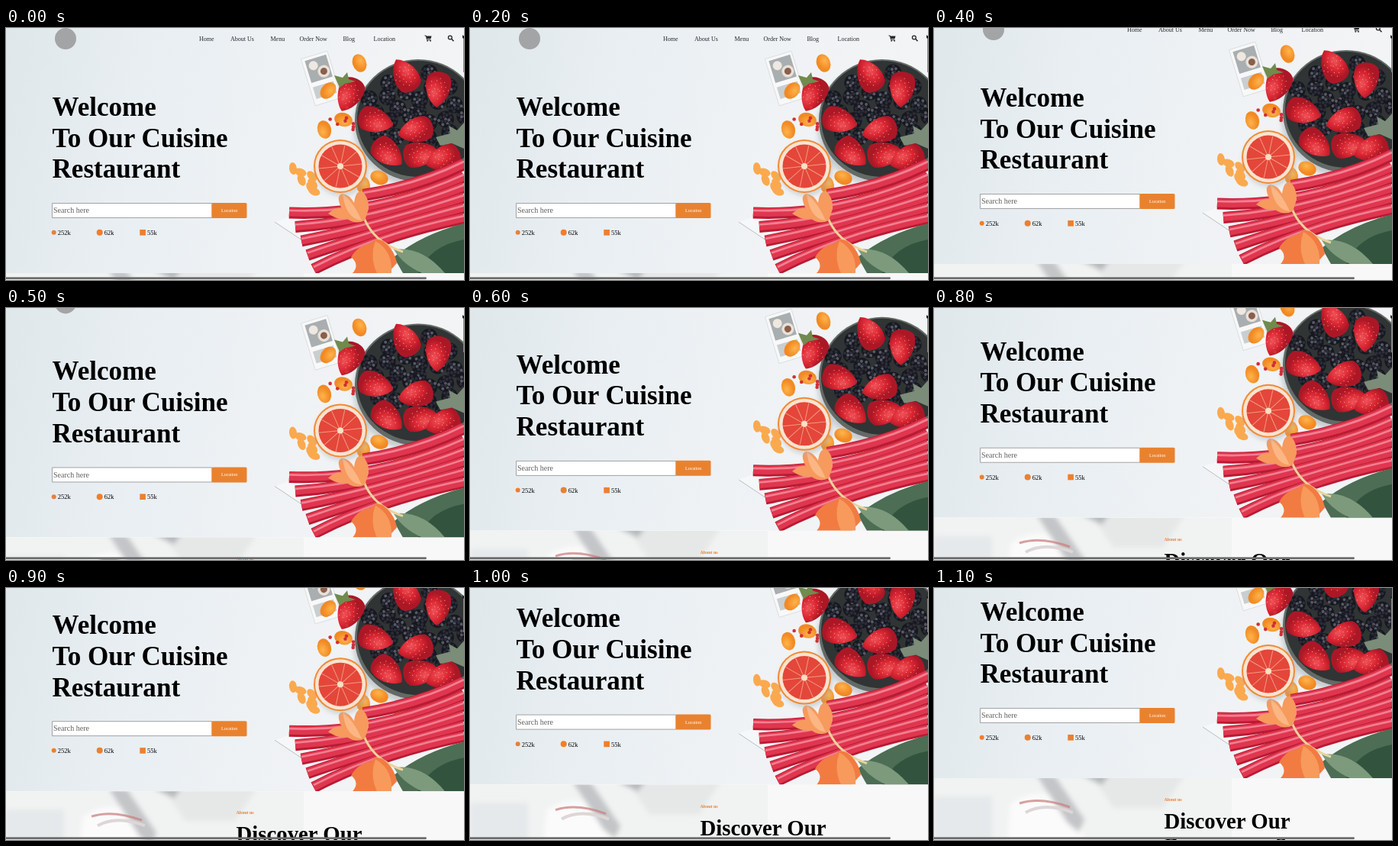
An HTML page for the animation above (1200 ms loop, 600 px wide and 330 px high).

```html
<!DOCTYPE html>
<html lang="en">
<head>
<meta charset="utf-8">
<title>Restaurant page</title>
<style>
html, body { margin: 0; width: 100%; height: 100%; overflow: hidden; background: #f7f8f8; }
svg { display: block; width: 600px; height: 330px; font-family: "Liberation Serif", Times, serif; }
.big { font-size: 35.1px; font-weight: 700; }
.about { font-size: 28.8px; font-weight: 700; }
.nav { font-size: 8px; fill: #25282c; }
.small { font-size: 8.5px; }
.orange { fill: #ee7f2d; }
</style>
</head>
<body>
<svg viewBox="0 0 600 330">
  <defs>
    <linearGradient id="wall" x2="1" y2=".12">
      <stop offset="0" stop-color="#dfe7eb"/>
      <stop offset=".3" stop-color="#e8eef2"/>
      <stop offset=".65" stop-color="#eff2f5"/>
      <stop offset="1" stop-color="#f3f4f5"/>
    </linearGradient>
    <radialGradient id="berry" cx=".4" cy=".35">
      <stop offset="0" stop-color="#f0525a"/>
      <stop offset=".6" stop-color="#d82532"/>
      <stop offset="1" stop-color="#ac1726"/>
    </radialGradient>
    <radialGradient id="citrus" cx=".4" cy=".35">
      <stop offset="0" stop-color="#ffb44c"/>
      <stop offset="1" stop-color="#f18a24"/>
    </radialGradient>
    <filter id="soft"><feGaussianBlur stdDeviation="3"/></filter>
    <clipPath id="hero"><path d="M0 0H600V321H0z"/></clipPath>
    <clipPath id="photo"><path d="M0 321H390V420H0z"/></clipPath>
  </defs>

  <g id="page">
    <g clip-path="url(#hero)">
      <path d="M0 0H600V321H0z" fill="url(#wall)"/>

      <!-- picture card and paper -->
      <g transform="rotate(-17 413 66)">
        <path d="M395 34H431V98H395z" fill="#f8f8f8" stroke="#d6dade" stroke-width=".8"/>
        <path d="M399 38H428V68H399z" fill="#a9aeb0"/>
        <circle cx="408" cy="47" r="6" fill="#eee8e0"/>
        <circle cx="419" cy="58" r="8" fill="#e8e1d8"/>
        <circle cx="419" cy="58" r="4.5" fill="#8a5f4c"/>
        <path d="M399 74H427V90H399z" fill="#c9ced1"/>
      </g>
      <path d="M352 254L392 240L416 268L391 280z" fill="#f6f7f8"/>
      <path d="M352 254L391 280" stroke="#b9bfc3"/>

      <!-- bowl -->
      <ellipse cx="539" cy="128" rx="84" ry="80" fill="#9ba5aa" opacity=".5" filter="url(#soft)"/>
      <ellipse cx="540" cy="121" rx="83" ry="80" fill="#636a66"/>
      <ellipse cx="540" cy="119" rx="80" ry="76" fill="#303434"/>
      <g id="fruit"></g>
      <path d="M563 143L582 138L580 128L591 134L600 124V158L584 151L569 154z" fill="#7b8c78"/>
      <g id="stalks" fill="none"></g>

      <!-- leaves and tulips -->
      <path d="M508 300Q545 270 600 256V321H520z" fill="#4d6d54"/>
      <path d="M540 321Q555 285 600 277V321z" fill="#32543f"/>
      <path d="M508 290Q545 285 575 321H545Q520 310 508 290z" fill="#7d9a7c"/>
      <path d="M468 246Q480 280 520 293" fill="none" stroke="#ead39b" stroke-width="3"/>
      <path d="M422 243Q434 233 440 237Q431 219 441 217Q450 218 456 229Q458 212 467 214Q476 223 475 237L470 252Q459 258 447 250Q435 252 422 243z" fill="#f69a5e"/>
      <path d="M441 217Q456 229 466 252Q445 250 441 217z" fill="#fbb684"/>
      <path d="M452 300Q462 284 478 282Q484 274 494 279Q509 290 512 308L500 321H454Q464 310 452 300z" fill="#f27b42"/>
      <path d="M484 279Q507 292 505 321H486Q476 300 484 279z" fill="#f79a5c"/>

      <!-- cut orange -->
      <g transform="translate(438 181)">
        <circle cx="2" cy="4" r="35" fill="#aab0b2" opacity=".5" filter="url(#soft)"/>
        <circle r="35" fill="#f08a36"/>
        <circle r="33" fill="#fbe3cf"/>
        <circle r="28.5" fill="#e4463a"/>
        <g id="slices" stroke="#f29a80"></g>
        <circle r="4" fill="#fbdfc4"/>
      </g>

      <!-- header -->
      <circle cx="78" cy="14" r="14" fill="#a3a4a5"/>
      <g class="nav">
        <text x="253" y="16.7">Home</text>
        <text x="294" y="16.7">About Us</text>
        <text x="346.5" y="16.7">Menu</text>
        <text x="384.5" y="16.7">Order Now</text>
        <text x="441.5" y="16.7">Blog</text>
        <text x="481.5" y="16.7">Location</text>
      </g>
      <g fill="none" stroke="#25282c">
        <path d="M548.5 10H550.2L551.5 15.3H556.5"/>
        <path d="M550.6 10.6H557.5L556.5 14H551.4z" fill="#25282c" stroke="none"/>
        <circle cx="552.2" cy="16.8" r=".6"/>
        <circle cx="556" cy="16.8" r=".6"/>
        <circle cx="581.8" cy="12.5" r="2.4" stroke-width="1.3"/>
        <path d="M583.6 14.3L586.5 17.2" stroke-width="1.6"/>
      </g>

      <g class="big">
        <text x="60.5" y="114.8">Welcome</text>
        <text x="60.5" y="155.6">To Our Cuisine</text>
        <text x="60.5" y="196.4">Restaurant</text>
      </g>

      <path d="M60.5 229.5H270V248.5H60.5z" fill="#fff" stroke="#a2a2a2"/>
      <text x="62" y="242.3" font-size="10" fill="#5f5f5f">Search here</text>
      <rect x="269.5" y="229" width="46" height="20" rx="1.5" fill="#e9822f"/>
      <text x="282" y="241" font-size="6" fill="#fff">Location</text>

      <g class="orange">
        <circle cx="62.7" cy="267.7" r="3"/>
        <circle cx="122.7" cy="267.7" r="4"/>
        <rect x="175.3" y="264" width="7.6" height="7.6"/>
      </g>
      <g class="small">
        <text x="67.7" y="271">252k</text>
        <text x="128.7" y="271">62k</text>
        <text x="185" y="271">55k</text>
      </g>
    </g>

    <!-- about section -->
    <path d="M0 321H600V420H0z" fill="#f8f8f8"/>
    <g clip-path="url(#photo)">
      <path d="M0 321H390V420H0z" fill="#f1f2f2"/>
      <g filter="url(#soft)">
        <path d="M0 345H76V420H0z" fill="#e5e9eb"/>
        <path d="M205 315H330L300 360H235z" fill="#e6e8e8"/>
        <path d="M100 355Q140 325 190 362L200 420H95z" fill="#fbfbfb"/>
        <path d="M134 316L158 318L197 375L190 392L175 380z" fill="#c3c5c7"/>
        <path d="M185 312L230 316L220 330z" fill="#b5b8ba"/>
      </g>
      <path d="M112 354Q140 345 178 359" fill="none" stroke="#cb8180" stroke-width="3" opacity=".75"/>
      <path d="M120 366Q145 352 182 366" fill="none" stroke="#ded6d6" stroke-width="4"/>
    </g>
    <text class="orange" x="301.5" y="351" font-size="6" font-weight="700">About us</text>
    <text class="about" x="301.5" y="387">Discover Our</text>
    <text class="about" x="301.5" y="419">Restaurant Story</text>
  </g>

  <!-- scrollbars -->
  <path d="M599 10H600V58H599z" fill="#8a8a8a"/>
  <path d="M598 9L600 11V14L598 13z" fill="#222"/>
  <rect x="-2" y="326.3" width="553" height="2.6" rx="1.3" fill="#6c6c6c"/>
</svg>

<script>
const $ = id => document.getElementById(id);
const repeat = (n, make) => Array.from({length: n}, (_, i) => make(i)).join('');

let seed = 7;
const random = () => (seed = seed * 16807 % 2147483647) / 2147483647;

// Point i of a sunflower spiral.
const spiral = (i, gap) => [gap * Math.sqrt(i) * Math.cos(i * 2.4), gap * Math.sqrt(i) * Math.sin(i * 2.4)];
const dot = (x, y, r, fill) => `<circle cx="${x}" cy="${y}" r="${r}" fill="${fill}"/>`;
const place = (x, y, turn, shape) => `<g transform="translate(${x} ${y}) rotate(${turn})">${shape}</g>`;

const blackberry = dot(0, 0, 11, '#17181f') +
  repeat(14, i => dot(...spiral(i, 2.6), 2, i % 3 ? '#2b2d38' : '#565965'));

const strawberry = '<path d="M-24 0C-17-12 2-20 16-15C25-9 25 9 16 15C2 20-17 12-24 0z" fill="url(#berry)"/>' +
  repeat(22, i => dot(...spiral(i, 3.1), .6, '#f3a873'));

const kumquat = '<ellipse rx="12" ry="9" fill="url(#citrus)"/>';

// Position and turn of each whole berry; the tip points left at turn 0.
const strawberries = [[523, 62, 60], [566, 80, -85], [484, 121, 195], [543, 165, 170],
  [537, 134, -15], [573, 171, -20], [500, 163, 220], [450, 87, -65]];
const kumquats = [[463, 46], [422, 82], [442, 120], [417, 133], [519, 218], [489, 196], [468, 206]];

$('fruit').innerHTML =
  repeat(26, i => {
    const [x, y] = spiral(i, 13.5);
    return place(540 + x, 109 + y * .8, i * 40, blackberry);
  }) +
  strawberries.map(([x, y, turn]) => place(x, y, turn, strawberry)).join('') +
  kumquats.map(([x, y], i) => place(x, y, 70 + i * 62, kumquat)).join('') +
  repeat(7, i => place(376 + random() * 34, 184 + i * 5, random() * 90, '<ellipse rx="8" ry="5" fill="#fba94f"/>')) +
  repeat(8, () => dot(420 + random() * 38, 102 + random() * 34, 2.3, '#cf3038')) +
  '<path d="M430 62L441 65L447 58L449 67L458 70L444 73L437 78z" fill="#718a4d"/>';

function stalk(x, y, bendX, bendY, endY, width) {
  const line = (color, part, shift) => `<path d="M${x} ${y + shift}Q${bendX} ${bendY + shift} 600 ${endY + shift}"
    stroke="${color}" stroke-width="${width * part}"/>`;
  return line('#b91a33', 1, 0) + line('#e0364f', .75, -1) + line('#f27f90', .18, -width * .2);
}
$('stalks').innerHTML = stalk(468, 219, 540, 208, 178, 16) +
  repeat(5, i => stalk(371 + 8 * i, 242 + 18.5 * i, 485, 247 + 6.5 * i, 195 + 13.5 * i, 15));

$('slices').innerHTML = repeat(10, i => `<path d="M0 0V28" transform="rotate(${i * 36 + 12})"/>`);

// The page rests, then scrolls steadily, redrawn every 100 ms.
function draw() {
  const step = Math.floor(performance.now() % 1200 / 100);
  const offset = Math.max(0, (step - 2.6) * 8.57);
  $('page').setAttribute('transform', `translate(0 ${-offset})`);
  requestAnimationFrame(draw);
}
draw();
</script>
</body>
</html>
```
